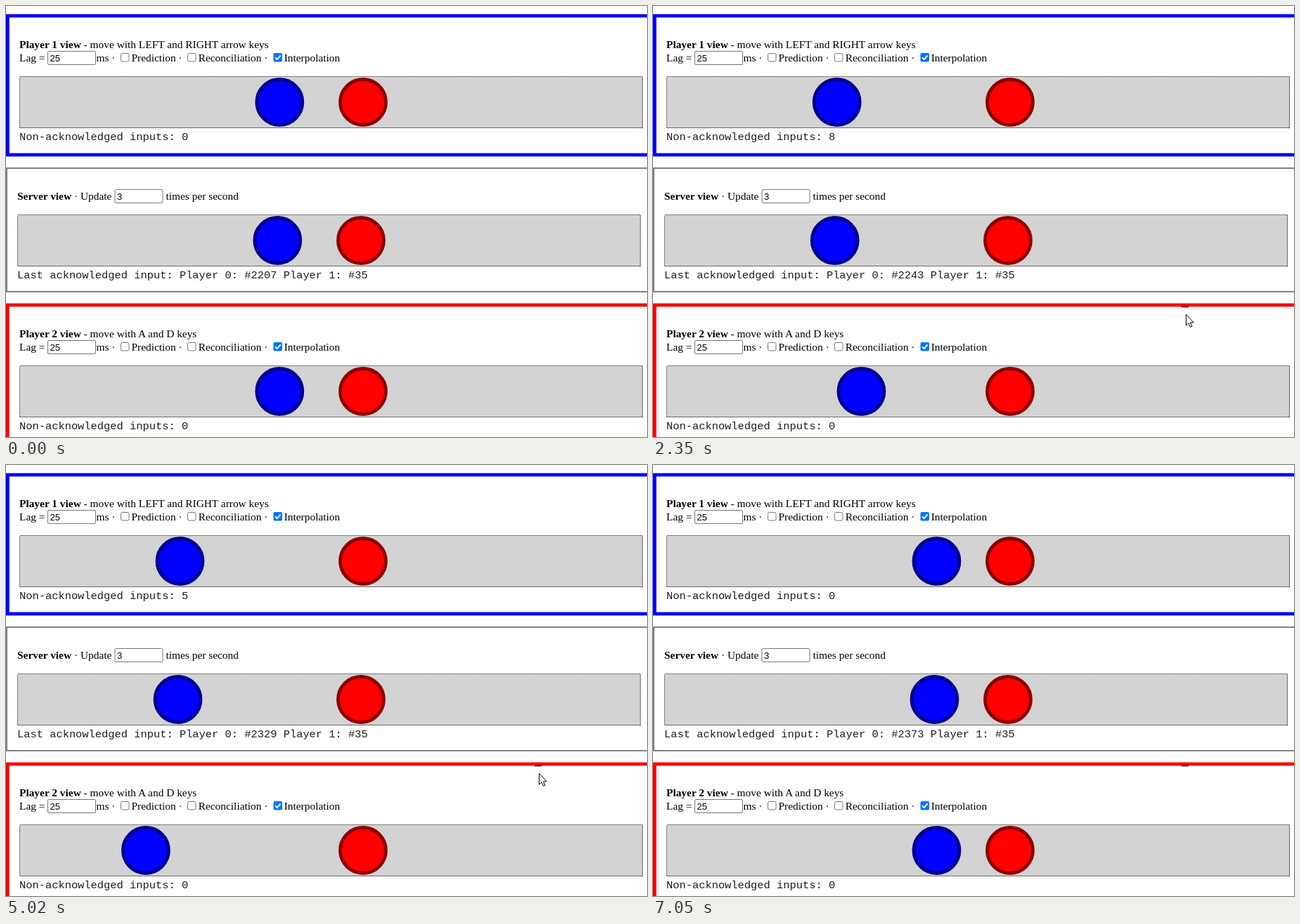
An HTML page that plays this animation: 912 by 614 pixels, repeating every 7500 ms.

```html
<!DOCTYPE html>
<html lang="en">
<head>
<meta charset="utf-8">
<title>Entity interpolation</title>
<style>
  html, body { margin: 0; width: 100%; height: 100%; overflow: hidden; background: #fff; }
  svg { display: block; }
  text { font: 15.4px "Liberation Serif", serif; white-space: pre; }
  .bold { font-weight: bold; }
  .mono { font-family: "Liberation Mono", monospace; fill: #1c1c1c; }
  .field { font: 13px "Liberation Sans", sans-serif; }
  .box { fill: #fff; stroke: #767676; }
  .arena { fill: #d3d3d3; stroke: #000; stroke-dasharray: 1 1; shape-rendering: crispEdges; }
  .ball { stroke-width: 4.8; }
</style>
</head>
<body>
<svg id="stage" width="912" height="614" viewBox="0 0 912 614"></svg>
<script>
const LOOP = 7500, STEP = 3.545, START_X = 389.3, FIRST_ID = 2207, TURN = 81;
const SERVER_LEAD = 18;

// [ms, inputs sent by player 1]; inputs after TURN go right
const SENT = [[1130, 0], [1150, 1], [1810, 24], [1910, 25], [2350, 44], [3050, 74],
  [3213, 81], [3880, 81], [4200, 94], [5740, 157], [5960, 166]];

// [ms of arrival, inputs acknowledged]
const ACKS = [[0, 0], [1225, 3], [1725, 20], [2190, 36], [2560, 52], [2955, 69], [3335, 81],
  [4095, 89], [4515, 106], [4905, 122], [5320, 139], [5732, 156], [6130, 166]];

// [ms, inputs shown in the interpolated view]
const INTERPOLATED = [[1240, 0], [1740, 3], [1810, 6.2], [1910, 6.2], [2196, 19.6], [2581, 36],
  [2963, 52.3], [3350, 69], [3735, 81], [4089, 81], [4515, 89], [4965, 106], [5355, 122],
  [5752, 139], [6150, 156], [6560, 166]];

// [ms, tip x, tip y]
const CURSOR = [[20, 851, 600], [140, 812, 540], [260, 768, 466], [340, 746, 430],
  [420, 751, 434], [500, 758, 439], [6800, 758, 439], [6900, 787, 480], [7040, 864, 606]];

const stage = document.getElementById("stage");

function add(parent, tag, attrs, text) {
  const node = document.createElementNS("http://www.w3.org/2000/svg", tag);
  for (const key in attrs) node.setAttribute(key, attrs[key]);
  if (text !== undefined) node.textContent = text;
  parent.appendChild(node);
  return node;
}

const group = (x, y) => add(stage, "g", { transform: `translate(${x} ${y})` });
const label = (g, x, y, text, cls = "") => add(g, "text", { x, y, class: cls }, text);

function frame(x, y, height, width, stroke) {
  add(stage, "rect", { x, y, width: 940, height, fill: "none", stroke, "stroke-width": width });
}

function heading(g, x, y, title, rest) {
  const line = label(g, x, y, "");
  add(line, "tspan", { class: "bold" }, title);
  add(line, "tspan", {}, rest);
}

function field(g, x, y, value) {
  add(g, "rect", { x: x + .5, y: y + .5, width: 68, height: 19, rx: 1.5, class: "box" });
  label(g, x + 3.5, y + 14.5, value, "field");
}

function checkbox(g, x, checked) {
  if (!checked) {
    add(g, "rect", { x: x + .5, y: 67.5, width: 11.5, height: 11.5, rx: 2, class: "box" });
    return;
  }
  add(g, "rect", { x, y: 67, width: 12.5, height: 12.5, rx: 2, fill: "#0075ff" });
  add(g, "path", { d: `M${x + 2.5} 73.3l2.7 2.8 4.9-5.6`, fill: "none", stroke: "#fff", "stroke-width": 1.9 });
}

function arena(x, y, status) {
  const g = group(x, y);
  add(g, "rect", { x: 19.5, y: 100.5, width: 886, height: 73, class: "arena" });
  const ball = (cx, fill, stroke) => add(g, "circle", { cx, cy: 137, r: 32.5, fill, stroke, class: "ball" });
  const blue = ball(START_X, "#00f", "#00008b");
  ball(508, "#f00", "#8b0000");
  return { blue, status: label(g, 19, 190.5, status, "mono") };
}

function playerView(y, color, title, keys) {
  frame(2.4, y + 14, 198, 4.8, color);
  const g = group(0, y);
  heading(g, 19, 60, title, ` - move with ${keys}`);
  label(g, 19, 79, "Lag =");
  field(g, 59, 64, "25");
  label(g, 128.5, 79, "ms ·");
  checkbox(g, 163);
  label(g, 178.5, 79, "Prediction ·");
  checkbox(g, 258);
  label(g, 273.7, 79, "Reconciliation ·");
  checkbox(g, 380.5, true);
  label(g, 395.7, 79, "Interpolation");
  return arena(0, y, "Non-acknowledged inputs: 0");
}

function serverView() {
  frame(1, 231, 176, 2, "#808080");
  const g = group(0, 0);
  heading(g, 16, 276, "Server view", " · Update");
  field(g, 154.5, 261, "3");
  label(g, 227.5, 276, "times per second");
  return arena(-3, 197, "");
}

const player1 = playerView(0, "#00f", "Player 1 view", "LEFT and RIGHT arrow keys");
const server = serverView();
const player2 = playerView(412, "#f00", "Player 2 view", "A and D keys");

const mark = add(stage, "rect", { x: 752, y: 428, width: 10, height: 1.4, fill: "#4a1010" });
const cursor = add(stage, "path", {
  d: "M0 .5V16.2L3.6 12.8 6 18.4 8.4 17.4 6 11.9H10.8Z",
  fill: "#fff", stroke: "#000", "stroke-width": 1
});

// Linear interpolation of one column, clamped at both ends
function sample(table, t, column = 1) {
  const next = table.findIndex(row => row[0] > t);
  if (next === 0) return table[0][column];
  if (next < 0) return table[table.length - 1][column];
  const a = table[next - 1], b = table[next];
  return a[column] + (b[column] - a[column]) * (t - a[0]) / (b[0] - a[0]);
}

const acknowledged = t => ACKS.filter(row => row[0] <= t).pop()[1];
const ballX = inputs => START_X - STEP * (TURN - Math.abs(TURN - inputs));

function draw(t) {
  const sent = Math.floor(sample(SENT, t) + 1e-6);
  const seen = acknowledged(t);
  const processed = Math.min(sent, acknowledged(t + SERVER_LEAD));

  player1.blue.setAttribute("cx", ballX(seen));
  player1.status.textContent = `Non-acknowledged inputs: ${sent - seen}`;
  server.blue.setAttribute("cx", ballX(processed));
  server.status.textContent = `Last acknowledged input: Player 0: #${FIRST_ID + processed} Player 1: #35`;
  player2.blue.setAttribute("cx", ballX(sample(INTERPOLATED, t)));

  const x = Math.round(sample(CURSOR, t)), y = Math.round(sample(CURSOR, t, 2));
  cursor.setAttribute("transform", `translate(${x + .5} ${y})`);
  cursor.setAttribute("visibility", t >= 20 && t < 7050 ? "visible" : "hidden");
  mark.setAttribute("visibility", t >= 340 ? "visible" : "hidden");
}

const begin = performance.now();
function tick() {
  draw((performance.now() - begin) % LOOP);
  requestAnimationFrame(tick);
}
draw(0);
requestAnimationFrame(tick);
</script>
</body>
</html>
```
